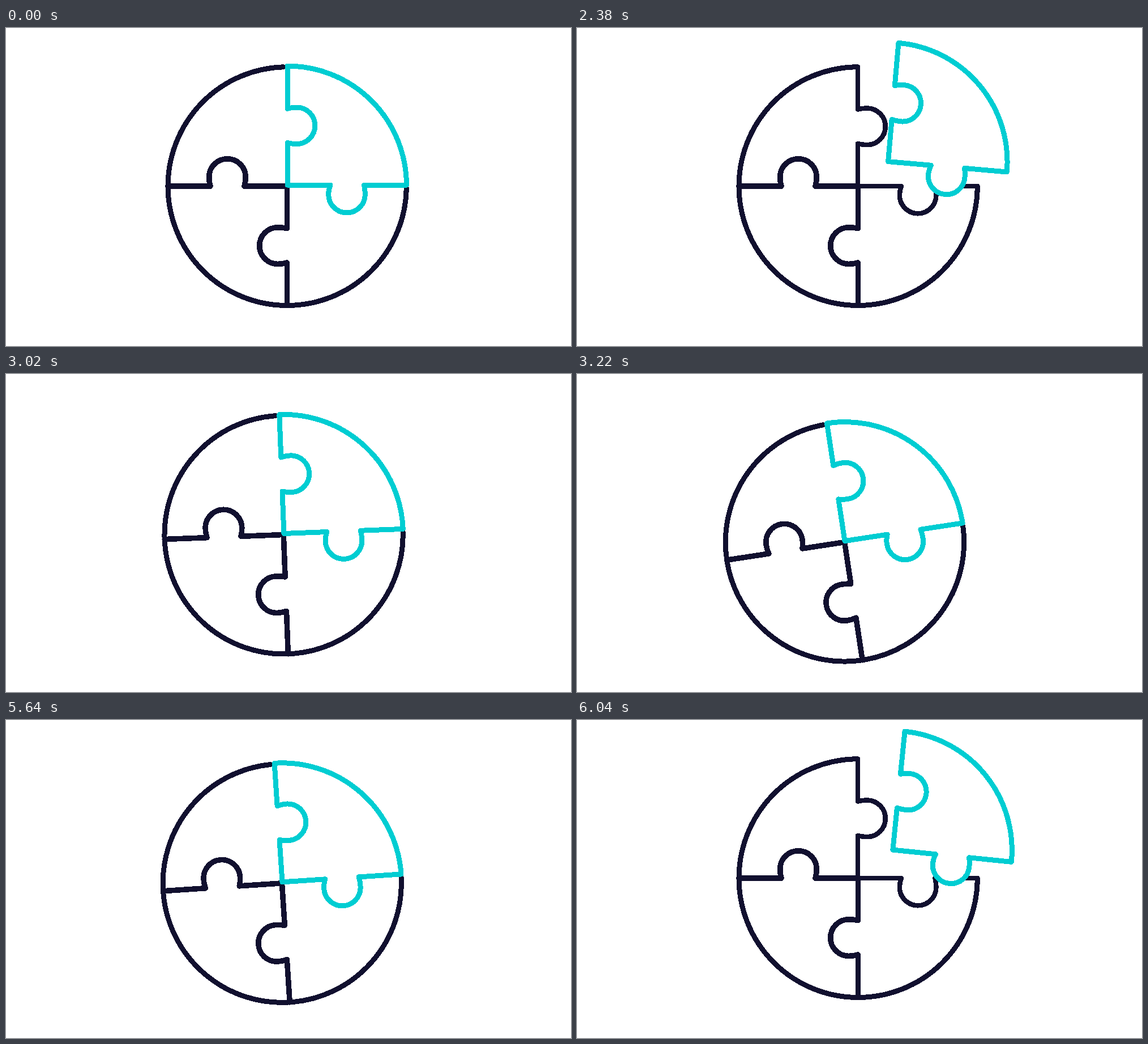
Animation of 998 by 561 pixels, one loop 6080 ms. Source, as an HTML page:

```html
<!DOCTYPE html>
<html lang="en">
<head>
<meta charset="utf-8">
<title>Puzzle circle</title>
<style>
  html, body { margin: 0; width: 100%; height: 100%; overflow: hidden; background: #fff; }
  svg { display: block; width: 100%; height: 100%; }
  path { fill: none; stroke-linecap: round; stroke-linejoin: round; shape-rendering: crispEdges; }
  .navy { stroke: #11102f; }
  .piece { fill: #fff; stroke: #00cdd2; stroke-width: 9; }
</style>
</head>
<body>
<svg viewBox="0 0 998 561">
  <g id="puzzle">
    <path class="navy" stroke-width="9"
      d="M490 68.8A210.5 210.5 0 0 0 286 279A210.5 210.5 0 0 0 496.5 489.5A210.5 210.5 0 0 0 707.3 283"/>
    <path class="navy" stroke-width="9.6"
      d="M286 279H361Q358.7 271 358.7 263A32.3 32.3 0 0 1 423.3 263Q423.3 271 421 279H496.3
         V353.5Q488 351.8 480 351.8A32.3 32.3 0 0 0 480 416.4Q488 416.4 496.3 414V489.5"/>
    <path id="socket" class="navy" stroke-width="8.6"
      d="M490 68.8L496 68.7V143.5Q504 141.5 512.5 141.5A32.3 32.3 0 0 1 512.5 206.1Q504 206.1 496 204
         V279H573Q569.8 287 569.8 295A32.3 32.3 0 0 0 634.4 295Q634.4 287 632.5 279H707.5V283"/>
    <path id="piece" class="piece"
      d="M497 67V142.5Q505 140 513.5 140A32.3 32.3 0 0 1 513.5 204.6Q505 204.6 497 202.5
         V277H573Q569.7 285 569.7 293.7A32.3 32.3 0 0 0 634.3 293.7Q634.3 285 632.5 277
         H707.5A210.5 210.5 0 0 0 497 67Z"/>
  </g>
</svg>
<script>
const LOOP = 6080, CYCLE = 3540, STEP = 40;
const $ = id => document.getElementById(id);
const puzzle = $('puzzle'), piece = $('piece'), socket = $('socket');

const span = (t, from, to) => Math.min(1, Math.max(0, (t - from) / (to - from)));
const easeIn = p => p ** 3;
const easeOut = p => 1 - (1 - p) ** 3;
const quadOut = p => 1 - (1 - p) ** 2;
const smooth = p => p * p * (3 - 2 * p);
const settle = p => 1 - (1 - p * p) ** 6;

const pose = (el, x, y, angle, cy) =>
  el.setAttribute('transform', `translate(${x} ${y}) rotate(${angle} 497 ${cy})`);

function draw(time) {
  const local = time % LOOP % CYCLE;
  const t = Math.floor((local - 20) / STEP) * STEP + 20;

  // wind-up, piece flies out and back, impact pushes the whole puzzle
  const wind = quadOut(span(t, 2060, 2160)) - smooth(span(t, 2160, 2310));
  const out = easeOut(span(t, 2230, 2540)) - easeIn(span(t, 2545, 3010));
  const push = easeOut(span(t, 3005, 3180)) - settle(span(t, 3180, 3540));

  pose(puzzle, -14 * wind - 25.7 * push, 13.8 * wind + 18.9 * push, -5.9 * wind - 9.3 * push, 278);
  pose(piece, 61 * out, -48 * out, 5.8 * out, 277);
  socket.style.display = out > 0 ? '' : 'none';
}

const start = performance.now();
function tick() {
  draw(performance.now() - start);
  requestAnimationFrame(tick);
}
tick();
</script>
</body>
</html>
```
